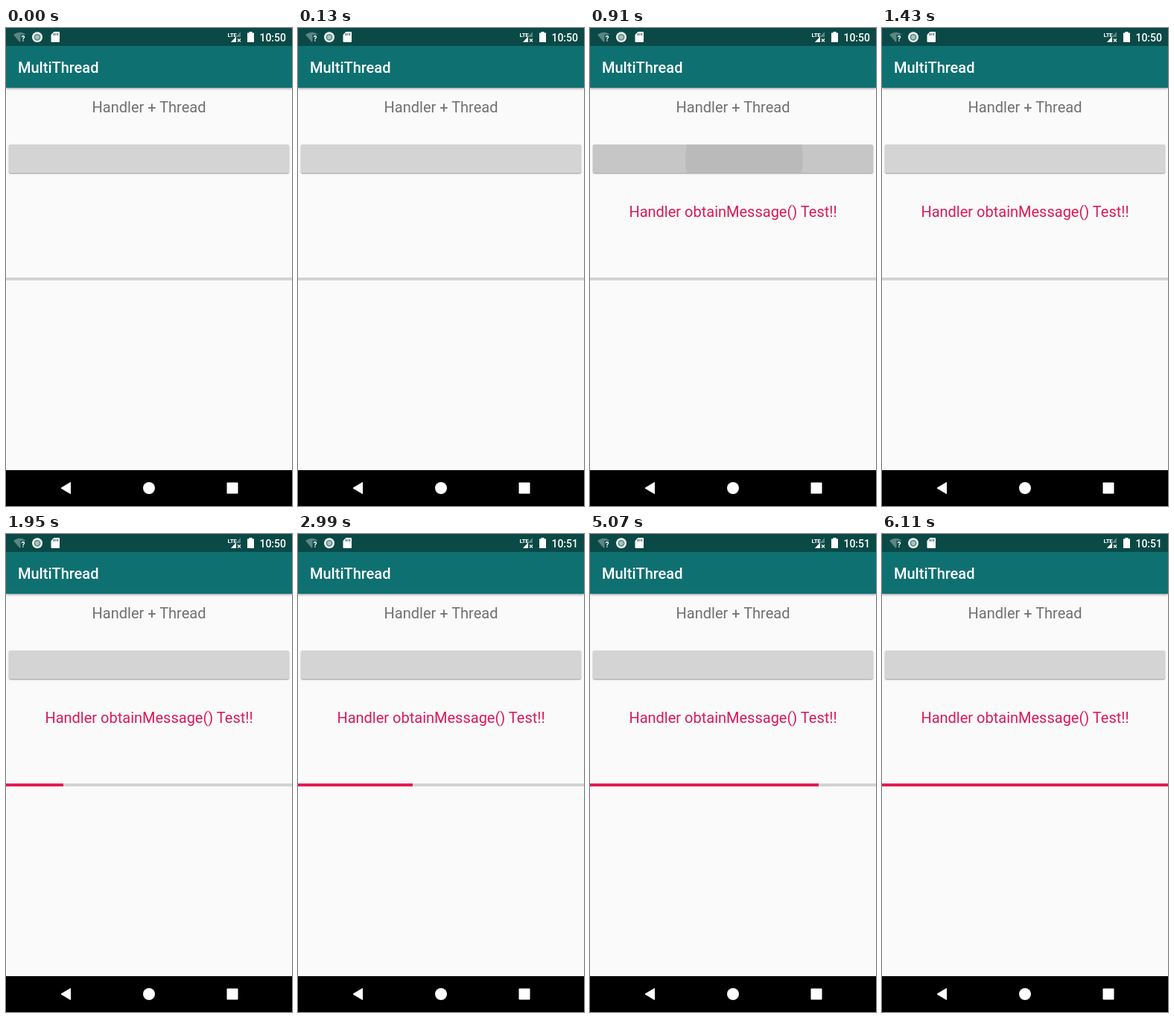
These frames come from a looping animation (384 by 640 pixels, 6890 ms). An HTML page:

```html
<!DOCTYPE html>
<html lang="en">
<head>
<meta charset="utf-8">
<title>MultiThread</title>
<style>
  html, body { margin: 0; width: 100%; height: 100%; overflow: hidden; }
  body { position: relative; background: #fafafa; }
  div, svg { position: absolute; }
  svg { left: 0; top: 0; }
  text { font-family: Roboto, sans-serif; }

  .toolbar { left: 0; top: 24px; width: 384px; height: 56px; background: #0f7072; box-shadow: 0 1px 3px rgba(0,0,0,.45); }
  .button { left: 4px; top: 156px; width: 376px; height: 38px; border-radius: 2px; overflow: hidden;
    background: #d4d4d4; box-shadow: 0 1px 2px rgba(0,0,0,.4); }
  .ripple { left: 203px; top: 19px; width: 0; height: 0; }
  .ripple::after { content: ""; position: absolute; left: -79px; top: -79px; width: 158px; height: 158px;
    border-radius: 50%; background: #000; }
  .track { left: 0; top: 334px; width: 384px; height: 4px; background: #d3d3d3; }
  .fill { left: 0; top: 0; height: 4px; width: 0; background: #e51c57; }

  .button, .ripple, .fill, .message, .before, .after { animation: 6890ms step-end infinite; }
  .button { animation-name: press; }
  .ripple { animation-name: ripple; }
  .fill { animation-name: fill; }
  .message { animation-name: message; }
  .before { animation-name: before; }
  .after { animation-name: after; }

  @keyframes press {
    11.32% { background: #d0d0d0; box-shadow: 0 2px 5px rgba(0,0,0,.5); }
    13.2% { background: #c6c6c6; box-shadow: 0 1px 2px rgba(0,0,0,.4); }
    15.09% { background: #c5c5c5; box-shadow: 0 1px 2px rgba(0,0,0,.4); }
    16.98% { background: #c9c9c9; box-shadow: 0 1px 2px rgba(0,0,0,.4); }
    18.86% { background: #cfcfcf; box-shadow: 0 1px 2px rgba(0,0,0,.4); }
    20.75%, 100% { background: #d4d4d4; box-shadow: 0 1px 2px rgba(0,0,0,.4); }
  }
  @keyframes ripple {
    0% { opacity: 0; }
    13.2% { opacity: .06; transform: none; }
    15.09% { opacity: .06; transform: translateX(-8px) scale(1.8); }
    16.98% { opacity: .04; transform: translateX(-13px) scale(2.3); }
    18.86% { opacity: .02; transform: translateX(-15px) scale(2.5); }
    20.75%, 100% { opacity: 0; }
  }
  @keyframes fill {
    0% { width: 0; }
    28.3% { width: 20%; }
    43.39% { width: 40%; }
    58.49% { width: 60%; }
    73.58% { width: 80%; }
    88.67%, 100% { width: 100%; }
  }
  @keyframes message { 0% { opacity: 0; } 13.2%, 100% { opacity: 1; } }
  @keyframes before { 0% { opacity: 1; } 41.5%, 100% { opacity: 0; } }
  @keyframes after { 0% { opacity: 0; } 41.5%, 100% { opacity: 1; } }
</style>
</head>
<body>
<div class="toolbar"></div>
<div class="button"><div class="ripple"></div></div>
<div class="track"><div class="fill"></div></div>

<svg width="384" height="640" viewBox="0 0 384 640" fill="#fff">
  <rect width="384" height="24" fill="#0a4946"/>

  <!-- status icons -->
  <path d="M10 9Q18.500 2.500 27 9L18.500 19Z" fill="#5c8583"/>
  <path d="M19.500 9H28V20H19.500Z" fill="#0a4946"/>
  <text x="20.500" y="18" font-size="10" font-weight="700">?</text>
  <circle cx="42" cy="12.300" r="7" fill="#e9f0ef"/>
  <circle cx="42" cy="12.300" r="4.400" fill="#5c8986"/>
  <circle cx="42" cy="12.300" r="2.800" fill="#a9c2c0"/>
  <path d="M64.500 5H71Q72 5 72 6V18Q72 19 71 19H61.500Q60.500 19 60.500 18V9Z"/>
  <path d="M64.500 7V10M67 7V10M69.500 7V10" stroke="#0a4946"/>
  <text x="297.500" y="11.500" font-size="8" font-weight="700" letter-spacing="-.4">LTE</text>
  <path d="M315 5V12H309V19H302Z" fill="#5c8583"/>
  <path d="M309 11.500V19H302Z"/>
  <path d="M311 14.500L315 18.500M315 14.500L311 18.500" stroke="#fff" stroke-width="1.200"/>
  <path d="M326.500 5H330.500V6.500H333V19H324V6.500H326.500Z"/>
  <g font-size="14" font-weight="500" text-anchor="end">
    <text class="before" x="376" y="18">10:50</text>
    <text class="after" x="376" y="18">10:51</text>
  </g>

  <text x="16" y="60" font-size="20" font-weight="500">MultiThread</text>
  <g font-size="20" text-anchor="middle">
    <text x="192" y="113" fill="#707070">Handler + Thread</text>
    <text class="message" x="192" y="253" fill="#d81b56">Handler obtainMessage() Test!!</text>
  </g>

  <!-- navigation bar -->
  <rect y="592" width="384" height="48" fill="#000"/>
  <path d="M74 616L86.500 608.500V623.500Z" stroke="#fff" stroke-linejoin="round"/>
  <circle cx="192" cy="616" r="8"/>
  <rect x="296.500" y="608.500" width="15" height="15" rx="1"/>
</svg>
</body>
</html>
```
